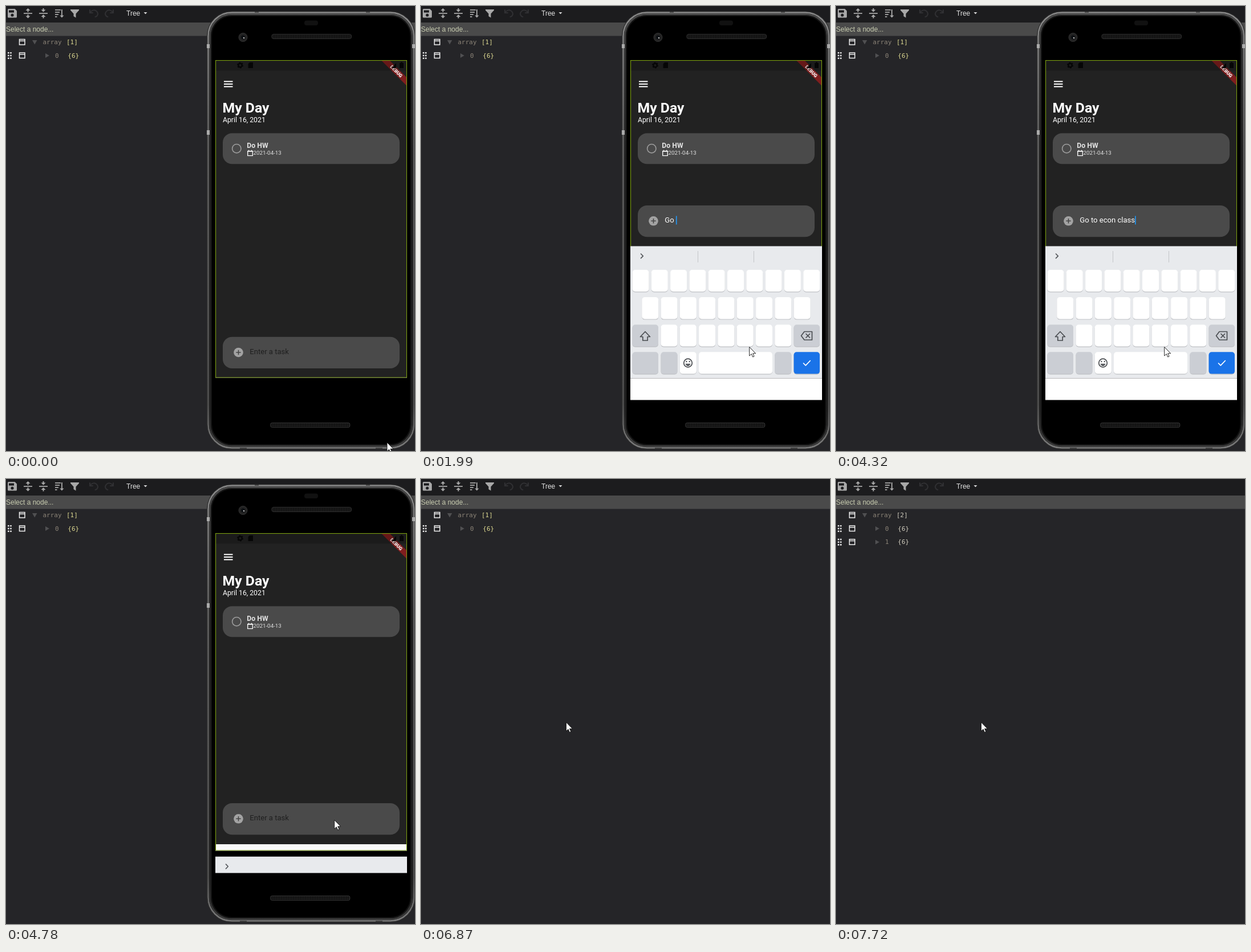
These frames come from a looping animation (717 px wide and 781 px high, 8000 ms). An HTML page:

```html
<!DOCTYPE html>
<html lang="en">
<head>
<meta charset="utf-8">
<title>Task app and data tree</title>
<style>
  html, body { margin: 0; width: 100%; height: 100%; overflow: hidden; background: #252528; }
  svg { display: block; width: 717px; height: 781px; }
  text { white-space: pre; }
  .ui { font: 12px "Liberation Sans", Arial, sans-serif; }
  .mono { font: 11px "DejaVu Sans Mono", monospace; }
  .app { font-family: Roboto, sans-serif; }
  .line { fill: none; stroke-linecap: round; stroke-linejoin: round; }
</style>
</head>
<body>
<svg viewBox="0 0 717 781" xmlns="http://www.w3.org/2000/svg">
  <defs>
    <linearGradient id="rim" x2="0" y2="1">
      <stop offset="0" stop-color="#8c8c8c"/><stop offset=".05" stop-color="#868686"/>
      <stop offset=".3" stop-color="#666"/><stop offset=".9" stop-color="#555"/>
      <stop offset="1" stop-color="#7c7c7c"/>
    </linearGradient>
    <linearGradient id="bevel" x2="0" y2="1">
      <stop offset="0" stop-color="#4a4a4a"/><stop offset=".08" stop-color="#383838"/>
      <stop offset=".35" stop-color="#222"/><stop offset=".92" stop-color="#222"/>
      <stop offset="1" stop-color="#3c3c3c"/>
    </linearGradient>
    <pattern id="mesh" width="3" height="3" patternUnits="userSpaceOnUse">
      <rect width="3" height="3" fill="#0d0d0d"/><circle cx="1.5" cy="1.5" r=".9" fill="#2c2c2c"/>
    </pattern>
    <clipPath id="screen"><rect x="367" y="95" width="336" height="596.500"/></clipPath>
    <clipPath id="appArea"><rect x="367" y="95" width="336" height="557.500"/></clipPath>
    <g id="box"><path d="M23.500 58.500h9.500v9.500h-9.500zM23.500 61.200h9.500" fill="none" stroke="#eee" stroke-width="1.500"/></g>
    <g id="grip" fill="#e6e6e6">
      <path d="M3 81h2.600v2.600h-2.600zM7.200 81h2.600v2.600h-2.600zM3 85.700h2.600v2.600h-2.600zM7.200 85.700h2.600v2.600h-2.600zM3 90.400h2.600v2.600h-2.600zM7.200 90.400h2.600v2.600h-2.600z"/>
    </g>
  </defs>

  <g id="page">
    <rect width="717" height="781" fill="#252528"/>
    <rect width="717" height="29" fill="#1c1c1e"/>
    <rect y="29" width="717" height="23.500" fill="#4a4a4a"/>
    <g fill="#a8a8a8">
      <path d="M4.500 5h11l3.500 3.500v10.500q0 1.500-1.500 1.500h-13q-1.500 0-1.500-1.500v-12.500q0-1.500 1.500-1.500z"/>
      <path d="M5 7.500h9v4h-9z" fill="#1c1c1e"/><circle cx="11" cy="16" r="2.600" fill="#1c1c1e"/>
      <path d="M31 12h15v1.800h-15zM38.500 4l4 4h-3v2.500h-2v-2.500h-3zM38.500 21.500l4-4h-3v-2.500h-2v2.500h-3z"/>
      <path d="M58 12h15v1.800h-15zM65.500 10.500l4-4h-3v-2.500h-2v2.500h-3zM65.500 15l4 4h-3v2.500h-2v-2.500h-3z"/>
      <path d="M86 6h10v1.700h-10zM86 10h8v1.700h-8zM86 14h6v1.700h-6zM86 18h3.500v1.700h-3.500zM97 6h1.800v10.500h2.700l-3.600 4-3.600-4h2.700z"/>
      <path d="M113 6h15v1.500l-5.500 6v7l-4-2.500v-4.500l-5.500-6z"/>
    </g>
    <g class="line" stroke="#303033" stroke-width="2">
      <path d="M147 7v5h5M147.500 11.500c3-5 9-5.500 12-1.500s1 8-3 9"/>
      <path d="M188 7v5h-5M187.500 11.500c-3-5-9-5.500-12-1.500s-1 8 3 9"/>
    </g>
    <text class="ui" x="211" y="17" fill="#e2e2e2">Tree</text>
    <path d="M241.500 11h6l-3 3.300z" fill="#ddd"/>
    <text class="ui" x="0" y="45" fill="#c8ccb0">Select a node...</text>
    <use href="#box"/><use href="#box" y="23.500"/><use href="#grip"/>
    <path d="M46 60h8.500l-4.250 7.500zM69 83v8l7-4z" fill="#505052"/>
    <g class="mono">
      <text x="64.500" y="67" fill="#8c8478">array</text>
      <text id="count" x="106" y="67"></text>
      <text x="86" y="90.500" fill="#8c8478">0</text>
      <text id="size" x="108.300" y="90.500">{6}</text>
    </g>
    <g id="added">
      <use href="#box" y="47.300"/><use href="#grip" y="23.700"/>
      <path d="M69 106.700v8l7-4z" fill="#505052"/>
      <text class="mono" x="86" y="114" fill="#8c8478">1</text>
      <text class="mono" x="108.300" y="114" fill="#d0ccbe">{6}</text>
    </g>
  </g>

  <g id="phone">
    <rect x="352.500" y="9.500" width="364.500" height="768" rx="43" fill="#111" stroke="#303030"/>
    <rect x="354.500" y="11.500" width="360.500" height="764" rx="41" fill="none" stroke="url(#rim)" stroke-width="2.500"/>
    <rect x="357.500" y="14.500" width="354.500" height="758" rx="38" fill="none" stroke="url(#bevel)" stroke-width="3"/>
    <rect x="360" y="17" width="349.500" height="753" rx="36" fill="#000" stroke="#141414" stroke-width="2"/>
    <path d="M352 67h5v7h-5zM352 218h5v8h-5zM712 67h5v7h-5z" fill="#aaa"/>
    <path d="M436 10.500h7M631 10.500h7M410 776.500h12M648 776.500h12" stroke="#333" stroke-width="2"/>
    <rect x="523" y="25.500" width="24" height="8.500" rx="4" fill="#111"/>
    <circle cx="415.500" cy="55" r="7.500" fill="#232323" stroke="#333"/>
    <circle cx="415.500" cy="55" r="3.600" fill="#0c0f12"/><circle cx="417" cy="56" r="1.300" fill="#bbb"/>
    <rect x="466" y="49.500" width="139.500" height="8" rx="3" fill="url(#mesh)" stroke="#303030"/>
    <rect x="463.500" y="731.500" width="139.500" height="8" rx="3" fill="url(#mesh)" stroke="#303030"/>

    <g class="app" clip-path="url(#screen)">
      <g clip-path="url(#appArea)">
        <rect x="367" y="95" width="336" height="558" fill="#fafafa"/>
        <rect id="scaffold" x="367" y="95" width="336" height="558" fill="#222"/>
        <path d="M658.500 96L703 140.500V126L673 96z" fill="#7f1e1e"/>
        <text transform="translate(684.300 114.500) rotate(45)" y="3" text-anchor="middle" font-size="8.300" font-weight="900" fill="#fff">DEBUG</text>
        <rect x="367" y="95" width="336" height="18.500" fill="#000" opacity=".2"/>
        <g fill="#060606">
          <circle cx="410.500" cy="104" r="3.200" fill="none" stroke="#060606" stroke-width="2.500"/>
          <circle cx="410.500" cy="104" r="4.800" fill="none" stroke="#060606" stroke-width="1.500" stroke-dasharray="2.500 2.530"/>
          <path d="M427 99h6v10h-8.500v-7.500zM690 100h2v-1.500h3v1.500h2v9h-7zM684 100v9h-8z"/>
        </g>
        <path d="M382 132.500h15.500M382 137h15.500M382 141.500h15.500" stroke="#fff" stroke-width="2"/>
        <g fill="#fff">
          <text x="379.500" y="187" font-size="24.800" font-weight="700">My Day</text>
          <text x="380" y="204" font-size="12.250">April 16, 2021</text>
        </g>
        <g id="cards"></g>
        <g id="entry">
          <rect x="380" width="310" height="55.300" rx="16.300" fill="#4a4a4a"/>
          <circle cx="407.500" cy="27.300" r="8.300" fill="#a3a3a3"/>
          <path d="M403.300 27.300h8.400M407.500 23.100v8.400" stroke="#444" stroke-width="1.600"/>
          <text id="hint" x="427.300" y="30" font-size="13.070" fill="#1f1f1f">Enter a task</text>
          <text id="typed" x="427.300" y="30" font-size="13.070" fill="#fff"></text>
          <rect id="caret" y="18.500" width="1.700" height="15" fill="#2196f3"/>
        </g>
        <rect x="367.500" y="95.500" width="335" height="556.500" fill="none" stroke="#7a9d10" stroke-width="1.200"/>
      </g>

      <g id="keyboard">
        <rect x="367" width="336" height="232" fill="#e8eaed"/>
        <rect x="367" y="232" width="336" height="60" fill="#fff"/>
        <g id="keys"></g>
        <g class="line" stroke="#4a4d51" stroke-width="1.700">
          <path d="M393 150l8.500 9h-4.300v6.500h-8.400v-6.500h-4.300z"/>
          <path d="M672 150h13.500v14.500h-13.500l-5.500-7.250zM675 154l6.500 6.500M681.500 154l-6.500 6.500"/>
          <circle cx="468" cy="205" r="7.300"/><path d="M464 207c1.500 4 6.500 4 8 0z" fill="#4a4d51" stroke-width=".8"/>
          <path d="M465.300 202.500h.1M470.700 202.500h.1" stroke-width="2.300"/>
          <path d="M670.500 205.500l3.800 3.800 8-8.300" stroke="#fff"/>
        </g>
        <g id="tools" class="line" stroke="#55585c" stroke-width="1.600">
          <path d="M389.500 14.500l-3.700 3.700 3.700 3.700"/>
          <circle cx="430.700" cy="16.700" r="4.500"/><path d="M434.200 20.200l4.500 4.500" stroke-width="2"/>
          <path d="M475 12.500h12v8l-4 4h-8zM487 20.500h-4v4M478 18.500c1 3 5 3 6 0M478.500 15.500h.1M483.500 15.500h.1"/>
          <text x="518.500" y="22" font-size="11" font-weight="900" letter-spacing=".7" fill="#55585c" stroke="none">GIF</text>
          <path d="M572.500 13h11v12h-11zM575.500 12h5v2.500h-5zM575 18h6M575 21h4"/>
          <path d="M607.500 9v18" stroke="#d3d5d8" stroke-width="1"/>
        </g>
        <path id="more" class="line" d="M385.500 13.500l3.800 3.800-3.800 3.800" stroke="#55585c" stroke-width="1.700"/>
        <path id="splits" d="M485.500 8.500v20M583.500 8.500v20" stroke="#c3c5c8"/>
      </g>
    </g>
  </g>
  <rect id="blank" width="717" height="781" fill="#fefefe"/>
  <path id="pointer" d="M0 0V15.500L3.600 12.200L6 17.500L8.400 16.400L6 11.300H11Z" fill="#fff" stroke="#111" stroke-width=".9"/>
</svg>
<script>
const LOOP = 8000, TICK = 77;
const $ = id => document.getElementById(id);
const show = (id, on) => $(id).setAttribute('display', on ? 'inline' : 'none');
const move = (id, x, y) => $(id).setAttribute('transform', `translate(${x} ${y})`);

function card(y, title, date) {
  return `<g transform="translate(0 ${y})">
    <rect x="380" width="310" height="54" rx="16.3" fill="#4a4a4a"/>
    <circle cx="404.300" cy="27" r="7.700" fill="none" stroke="#9c9c9c" stroke-width="1.600"/>
    <text x="422.300" y="25.500" font-size="12.250" font-weight="700" fill="#e4e4e4">${title}</text>
    <path d="M423.700 31.500h8.600v8h-8.600zM423.700 32h8.600M425.500 29.500v2M430.500 29.500v2" fill="none" stroke="#fff" stroke-width="1.300"/>
    <text x="433.400" y="38.200" font-size="9.800" fill="#e0e0e0">${date}</text></g>`;
}
$('cards').innerHTML = card(223.2, 'Do HW', '2021-04-13') +
  `<g id="newCard">${card(287, 'Go to econ class', '2021-04-16')}</g>`;

function key(x, row, w = 29, fill = '#fff') {
  const y = 41.5 + row * 48.1;
  return `<rect x="${x}" y="${y + 1}" width="${w}" height="38.500" rx="5" fill="#bfc1c5"/>
    <rect x="${x}" y="${y}" width="${w}" height="38.300" rx="5" fill="${fill}"/>`;
}
const keyRow = (n, x, row) =>
  Array.from({ length: n }, (_, i) => key(x + i * 33.3, row)).join('');
const GREY = '#cbced4';
$('keys').innerHTML = keyRow(10, 370.5, 0) + keyRow(9, 387.3, 1) + keyRow(7, 420.5, 2) +
  key(370.5, 2, 45.5, GREY) + key(653.5, 2, 45.5, GREY) +
  key(370.5, 3, 45.5, GREY) + key(420.5, 3, 29, GREY) + key(453.8, 3) +
  key(487, 3, 129) + key(620.3, 3, 29, GREY) + key(653.5, 3, 45.5, '#1a73e8');

// [start ms, keyboard top, entry top]
const SLIDE = [
  [0, 692, 580.7], [770, 640, 580.7], [840, 565, 525], [920, 482, 424],
  [990, 431.7, 364.7], [1070, 425, 354], [1140, 422.5, 351], [1210, 421.5, 350],
  [4630, 440, 350], [4700, 570, 450], [4780, 662.7, 569], [4850, 684, 578], [4930, 692, 580.7]
];
// [start ms, number of letters typed]
const TASK = 'Go to econ class';
const TYPING = [
  [0, 0], [1610, 1], [1840, 2], [1990, 3], [2300, 4], [2450, 6], [2620, 7], [2770, 8],
  [2930, 9], [3080, 10], [3230, 11], [3310, 12], [3390, 13], [3460, 14], [3540, 15],
  [3620, 16], [4630, 0]
];
const stepAt = (table, t) => table.findLast(row => row[0] <= t);

const clamp = u => Math.min(1, Math.max(0, u));
const ease = u => u * u * (3 - 2 * u);
const bend = (a, b, c, u) => a * (1 - u) ** 2 + 2 * b * u * (1 - u) + c * u * u;

function pointerAt(t) {
  const q = Math.floor((t + 10) / TICK) * TICK;
  if (t < 5100) {
    const u = ease(clamp(q / 690));
    return [668 - 92.3 * u, 766 - 167.5 * u];
  }
  const u = ease(clamp((q - 5080) / 770));
  return [bend(575.7, 430, 254.5, u), bend(598.5, -20, 427, u)];
}

function draw(t) {
  const [, kbTop, entryTop] = stepAt(SLIDE, t);
  const letters = stepAt(TYPING, t)[1];
  const focused = t >= 770 && t < 4630;
  const reloaded = t >= 7640;

  move('keyboard', 0, kbTop);
  move('entry', 0, entryTop);
  $('scaffold').setAttribute('height', entryTop + 72 - 95);
  show('tools', t < 1610);
  show('more', t >= 1610);
  show('splits', t >= 1610 && t < 4630);

  $('typed').textContent = TASK.slice(0, letters);
  show('hint', !letters);
  show('caret', focused);
  $('caret').setAttribute('x', 427.3 + (letters ? $('typed').getComputedTextLength() : 0));

  show('newCard', t >= 5160);
  show('phone', t < 6790);
  show('blank', t >= 7570 && !reloaded);
  show('added', reloaded);
  $('count').textContent = reloaded ? '[2]' : '[1]';
  for (const id of ['count', 'size']) $(id).setAttribute('fill', reloaded ? '#d0ccbe' : '#dcd890');
  move('pointer', ...pointerAt(t));
}

const start = performance.now();
function frame() {
  draw((performance.now() - start) % LOOP);
  requestAnimationFrame(frame);
}
frame();
</script>
</body>
</html>
```
